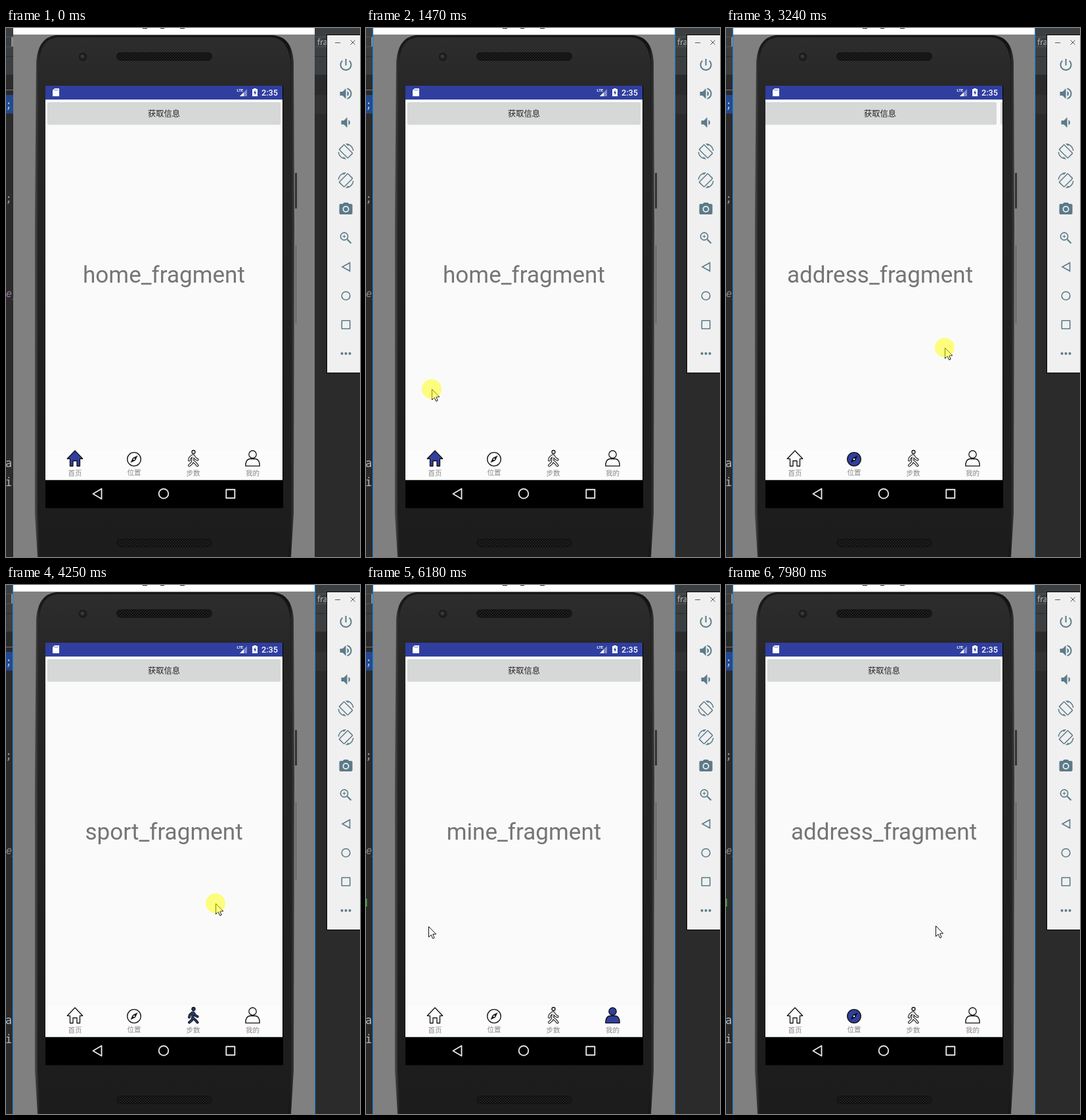
These frames come from a looping animation (539 by 806 pixels, 8000 ms). An HTML page:

```html
<!DOCTYPE html>
<html lang="zh">
<head>
<meta charset="utf-8">
<title>Fragment pager</title>
<style>
html, body { margin: 0; width: 100%; height: 100%; overflow: hidden; background: #2b2b2b; }
svg { display: block; width: 539px; height: 806px; }
.code { font: 17px "DejaVu Sans Mono", monospace; fill: #a9b7c6; }
.word { font-size: 15px; font-style: italic; fill: #9876aa; }
.live .word { fill: #8a8a8a; }
.title { font: 35.1px Roboto, sans-serif; fill: #757575; text-anchor: middle; }
.btn { font: 12.3px "Noto Sans CJK SC", "Noto Sans CJK", sans-serif; fill: #222; text-anchor: middle; }
.bar { font: 500 12.6px Roboto, sans-serif; fill: #fff; }
.tab { fill: none; stroke: #111; stroke-width: 1.3; stroke-linejoin: round; stroke-linecap: round; }
.tab text { font: 10.6px "Noto Sans CJK SC", "Noto Sans CJK", sans-serif; fill: #888; stroke: none; text-anchor: middle; }
.on .body { fill: #303f9f; }
.limb { stroke-width: 4; }
.core { stroke: #fcfcfc; stroke-width: 1.9; }
.on .core { stroke: #2c3d78; }
.on .head { fill: #2c3d78; }
.needle { fill: #111; stroke-width: .5; }
.dot { fill: #fff; stroke: none; }
.line { fill: none; stroke: #5b7b89; stroke-width: 1.6; }
.focus, #cursor { display: none; }
.live .focus, .live #cursor { display: inline; }
</style>
</head>
<body>
<svg id="stage" viewBox="0 0 539 806">
  <defs>
    <linearGradient id="shell" x2="0" y2="1">
      <stop offset="0" stop-color="#2d2d2d"/><stop offset=".12" stop-color="#262626"/><stop offset="1" stop-color="#1c1c1c"/>
    </linearGradient>
    <linearGradient id="rim" x2="1" y2="0">
      <stop offset="0" stop-color="#4a4a4a"/><stop offset=".02" stop-color="#191919"/>
      <stop offset=".98" stop-color="#141414"/><stop offset="1" stop-color="#3c3c3c"/>
    </linearGradient>
    <pattern id="mesh" width="4" height="4" patternUnits="userSpaceOnUse">
      <rect width="4" height="4" fill="#0d0d0d"/><path d="M0 0h1.5v1.5H0zM2 2h1.5v1.5H2z" fill="#303030"/>
    </pattern>
    <clipPath id="screen"><rect x="60" y="109" width="361" height="530"/></clipPath>
    <path id="limbs" d="M285 652L284 660M284 651.5L280 655L279 658.5M285.5 651.5L288.500 656L291.5 657.5M284 660L283 663L279 666.5M285 660L288.5 663L291.5 666.5"/>
    <path id="turn" d="M16.480 2.520c3.270 1.550 5.610 4.720 5.970 8.480h1.500C23.440 4.840 18.290 0 12 0l-.66.030 3.810 3.810zM10.230 1.750c-.59-.59-1.540-.59-2.120 0L1.750 8.110c-.59.59-.59 1.540 0 2.120l12.020 12.020c.59.59 1.540.59 2.120 0l6.360-6.360c.59-.59.59-1.540 0-2.120zm4.600 19.440L2.810 9.170l6.360-6.360 12.020 12.020zM7.520 21.480C4.250 19.940 1.910 16.760 1.550 13H.05C.56 19.160 5.710 24 12 24l.66-.030-3.810-3.810z"/>
  </defs>

  <!-- editor behind -->
  <rect width="539" height="806" fill="#2b2b2b"/>
  <rect width="539" height="71" fill="#3c3f41"/>
  <path d="M0 13.5H11M0 28.5H11M471 13.5H488M471 28.5H488" stroke="#55585a"/>
  <path d="M0 43.5H539M0 71.5H539" stroke="#2a2c2d"/>
  <rect x="8" y="14" width="3" height="14" fill="#8b8d8e"/>
  <path d="M0 94.5H11" stroke="#777"/>
  <rect y="102" width="539" height="29" fill="#323232"/>
  <rect y="102" width="11" height="28" fill="#214a92"/>
  <text x="474" y="26" font-family="Noto Sans, sans-serif" font-size="12" fill="#bbb">fragment</text>
  <g class="code">
    <text x="-1" y="123">;</text>
    <text x="-1" y="266" opacity=".75">;</text>
    <text class="word" x="-9" y="410">re_</text>
    <text x="-1" y="669">ar</text>
    <text x="-1" y="698">in</text>
  </g>
  <rect id="mark" y="478" width="1.5" height="12" fill="#3fae3f"/>

  <!-- emulator window -->
  <rect x="11" width="459" height="806" fill="#808080"/>
  <rect x="11" width="459" height="10" fill="#fff"/>
  <path d="M208 0h7v1h-7zM235 0h6v1h-6zM265 0h7v1h-7z" fill="#222838"/>
  <path class="focus" d="M10.5 0V806M470.5 0V806" stroke="#2583d0" stroke-width="1.2"/>
  <path d="M440 221h3v54h-3z" fill="#333"/>
  <path d="M441.5 331v119" stroke="#555"/>
  <path d="M78 11H405C425 12 436 24 438 52L439 300L438 740L434 806H48L44 740V300L46 52C48 24 60 12 78 11Z" fill="url(#rim)"/>
  <path d="M80 14H403C421 15 431 27 433 54L435 300L434 740L430 806H52L48 740V300L50 54C52 27 62 15 80 14Z" fill="url(#shell)"/>
  <g fill="url(#mesh)" stroke="#111">
    <rect x="168.5" y="37.5" width="145" height="12" rx="6"/>
    <rect x="168.5" y="778.5" width="145" height="12" rx="6"/>
  </g>
  <circle cx="117" cy="44" r="6.5" fill="#1c1c1c"/>
  <circle cx="116.5" cy="43.5" r="3" fill="#303234"/>
  <circle cx="115.5" cy="42.5" r="1" fill="#555"/>

  <!-- status bar -->
  <rect x="60" y="88" width="362" height="643.5" fill="#000"/>
  <rect x="60" y="88" width="361" height="21" fill="#303f9f"/>
  <path d="M74 92h7v12H71V95z" fill="#fff"/>
  <path d="M74.5 93.5v2M76.5 93.5v2M78.5 93.5v2" stroke="#303f9f" stroke-width=".8"/>
  <text class="bar" x="351.5" y="97" style="font-weight:700;font-size:6px">LTE</text>
  <path d="M367 93V104H356Z" fill="#fff" opacity=".4"/>
  <path d="M362 98V104H356Z" fill="#fff"/>
  <path d="M377 93V92h4v1h2v11h-8V93z" fill="#fff"/>
  <path d="M379.5 94.5l-2.5 4.5h1.7v3.5l2.5-4.7h-1.7z" fill="#303f9f"/>
  <text class="bar" x="389" y="103">2:35</text>

  <!-- pager -->
  <rect x="60" y="109" width="361" height="579" fill="#fafafa"/>
  <rect x="60" y="109" width="361" height="4" fill="#fdfdfd"/>
  <g clip-path="url(#screen)"><g id="pages"></g></g>

  <!-- tabs -->
  <rect x="60" y="642" width="361" height="46" fill="#fcfcfc"/>
  <path d="M60 688.5H421" stroke="#b5c9bd"/>
  <g class="tab">
    <path class="body" d="M105 644L93.3 656.3H97.5V667.5H102V659.5H108V667.5H112.5V656.3H116.7Z"/>
    <text x="105" y="682">首页</text>
  </g>
  <g class="tab">
    <circle class="body" cx="195" cy="657" r="10.3"/>
    <path class="needle" d="M200 652L196.8 658.8L190 662L193.2 655.2Z"/>
    <circle class="dot" cx="195" cy="657" r="1.3"/>
    <text x="195" y="681">位置</text>
  </g>
  <g class="tab">
    <use href="#limbs" class="limb"/>
    <use href="#limbs" class="core"/>
    <circle class="head" cx="285.5" cy="646" r="2.5"/>
    <text x="285" y="682">步数</text>
  </g>
  <g class="tab">
    <path class="body" d="M364.8 667.3C364.8 660 367 657 371 656.5H380C384 657 386.2 660 386.2 667.3Z"/>
    <circle class="body" cx="375.5" cy="649.7" r="5.7"/>
    <text x="375.5" y="682">我的</text>
  </g>
  <g fill="none" stroke="#e6e6e6" stroke-width="1.9" stroke-linejoin="round">
    <path d="M145.5 702V717.5L132.5 709.7Z"/><circle cx="240" cy="709.5" r="7.3"/><rect x="335.3" y="703.3" width="13" height="13"/>
  </g>

  <!-- tool panel -->
  <rect x="488.5" y="10.5" width="52" height="515" fill="#f0f0f0" stroke="#000"/>
  <path d="M501 22.5h8M524.5 18.5l7 7M531.5 18.5l-7 7" stroke="#555" fill="none"/>
  <g id="tools" fill="#5b7b89">
    <path d="M13 3h-2v10h2V3zm4.830 2.170l-1.420 1.420C17.990 7.860 19 9.810 19 12c0 3.870-3.130 7-7 7s-7-3.130-7-7c0-2.190 1.010-4.140 2.580-5.420L6.170 5.170C4.230 6.820 3 9.260 3 12c0 4.970 4.030 9 9 9s9-4.030 9-9c0-2.740-1.230-5.180-3.170-6.830z"/>
    <path d="M3 9v6h4l5 5V4L7 9H3zm13.5 3c0-1.770-1.020-3.290-2.500-4.030v8.050c1.480-.73 2.500-2.250 2.500-4.020zM14 3.230v2.060c2.890.86 5 3.540 5 6.710s-2.110 5.850-5 6.710v2.060c4.010-.91 7-4.490 7-8.770s-2.990-7.860-7-8.770z"/>
    <path d="M18.5 12c0-1.770-1.020-3.290-2.500-4.030v8.050c1.480-.73 2.500-2.250 2.500-4.020zM5 9v6h4l5 5V4L9 9H5z"/>
    <use href="#turn"/>
    <use href="#turn" transform="matrix(-1 0 0 1 24 0)"/>
    <g><path d="M9 2L7.170 4H4c-1.100 0-2 .9-2 2v12c0 1.100.9 2 2 2h16c1.100 0 2-.9 2-2V6c0-1.100-.9-2-2-2h-3.170L15 2zm3 15a5 5 0 1 1 0-10a5 5 0 0 1 0 10z"/><circle cx="12" cy="12" r="3.2"/></g>
    <g class="line"><circle cx="9.5" cy="9.5" r="5.6"/><path d="M7 9.5h5M9.5 7v5" stroke-width="1.2"/><path d="M14 14l6 6" stroke-width="2.2"/></g>
    <path class="line" d="M18 5.700V18.300L6.500 12Z"/>
    <circle class="line" cx="12" cy="12" r="6.3"/>
    <rect class="line" x="5.8" y="5.8" width="12.4" height="12.4" rx=".5"/>
    <g><circle cx="6" cy="12" r="2"/><circle cx="12" cy="12" r="2"/><circle cx="18" cy="12" r="2"/></g>
  </g>

  <g id="cursor">
    <path d="M.5 .5V16.500L4.200 13L6.700 18.700L9.200 17.600L6.700 12H11.700Z" fill="#fff" stroke="#111"/>
    <circle id="halo" r="15" fill="#ff0" opacity=".5"/>
  </g>
</svg>
<script>
const $ = id => document.getElementById(id);
const LOOP = 8000, PAGE = 361;
// The picture refreshes once per tick; all times below are in ticks
const START = 210, TICK = 77.5;
const DRAG = 2, SETTLE = 4, RETURN = 5.5, SELECT = 3;

const swipes = [
  { down: 15, slide: 16, from: [305, 577], to: [15, 539], page: 0 },
  { down: 26, slide: 27, from: [335, 545], to: [47, 520], page: 1 },
  { down: 39, slide: 38.7, from: [333, 487], to: [75, 490], page: 2 },
  { down: 52, slide: 52.3, from: [319, 485], to: [5, 484], page: 3 },
  { down: 66, slide: 67, from: [95, 535], to: [507, 506], page: 3 },
  { down: 80, slide: 81, from: [95, 520], to: [443, 503], page: 2 },
  { down: 92, slide: 93, from: [73, 514], to: [525, 495], page: 1 }
];
const entry = [474, 640], rest = [319, 519];

const clamp = k => Math.max(0, Math.min(1, k));
const smooth = k => k * k * (3 - 2 * k);
const mix = (a, b, k) => a.map((v, i) => Math.round(v + (b[i] - v) * k));

function pointer(n) {
  const i = swipes.findLastIndex(s => s.down <= n);
  const next = i + 1 < swipes.length ? swipes[i + 1].from : rest;
  if (i < 0) return mix(entry, next, smooth(clamp(n / swipes[0].down)));
  const { down, from, to } = swipes[i], age = n - down;
  return age <= DRAG
    ? mix(from, to, Math.sin(age / DRAG * Math.PI / 2))
    : mix(to, next, smooth(clamp((age - DRAG) / RETURN)));
}

// A swipe that keeps its page springs back
function scroll(n) {
  let at = 0, page = 0;
  for (const s of swipes) {
    const k = clamp((n - s.slide) / SETTLE);
    const side = Math.sign(s.from[0] - s.to[0]);
    at += s.page === page ? side * .532 * Math.sin(Math.PI * Math.sqrt(k)) : (s.page - page) * smooth(k);
    page = s.page;
  }
  return Math.round(at * PAGE);
}

$('pages').innerHTML = ['home', 'address', 'sport', 'mine'].map((name, i) => `
  <g transform="translate(${i * PAGE})">
    <rect x="63" y="114" width="355" height="33.5" rx="2" fill="#dedede"/>
    <rect x="63" y="113" width="355" height="34" rx="2" fill="#d6d7d7"/>
    <text class="btn" x="240.5" y="134.5">获取信息</text>
    <text class="title" x="240.5" y="388">${name}_fragment</text>
  </g>`).join('');
[...$('tools').children].forEach((el, i) => {
  const own = el.getAttribute('transform') || '';
  el.setAttribute('transform', `translate(505.5 ${44 + i * 44}) ${own}`);
});
const tabs = document.querySelectorAll('.tab');

function draw() {
  const n = Math.floor((performance.now() % LOOP - START) / TICK + .02);
  const tab = swipes.reduce((page, s) => n >= s.down + SELECT ? s.page : page, 0);
  const held = swipes.some(s => n >= s.down && n < s.down + DRAG);
  $('stage').classList.toggle('live', n >= 0);
  $('pages').setAttribute('transform', `translate(${-scroll(n)})`);
  $('cursor').setAttribute('transform', `translate(${pointer(n)})`);
  $('halo').style.display = held ? '' : 'none';
  $('mark').style.display = n >= swipes[3].down + DRAG ? '' : 'none';
  tabs.forEach((el, i) => el.classList.toggle('on', i === tab));
  requestAnimationFrame(draw);
}
draw();
</script>
</body>
</html>
```
